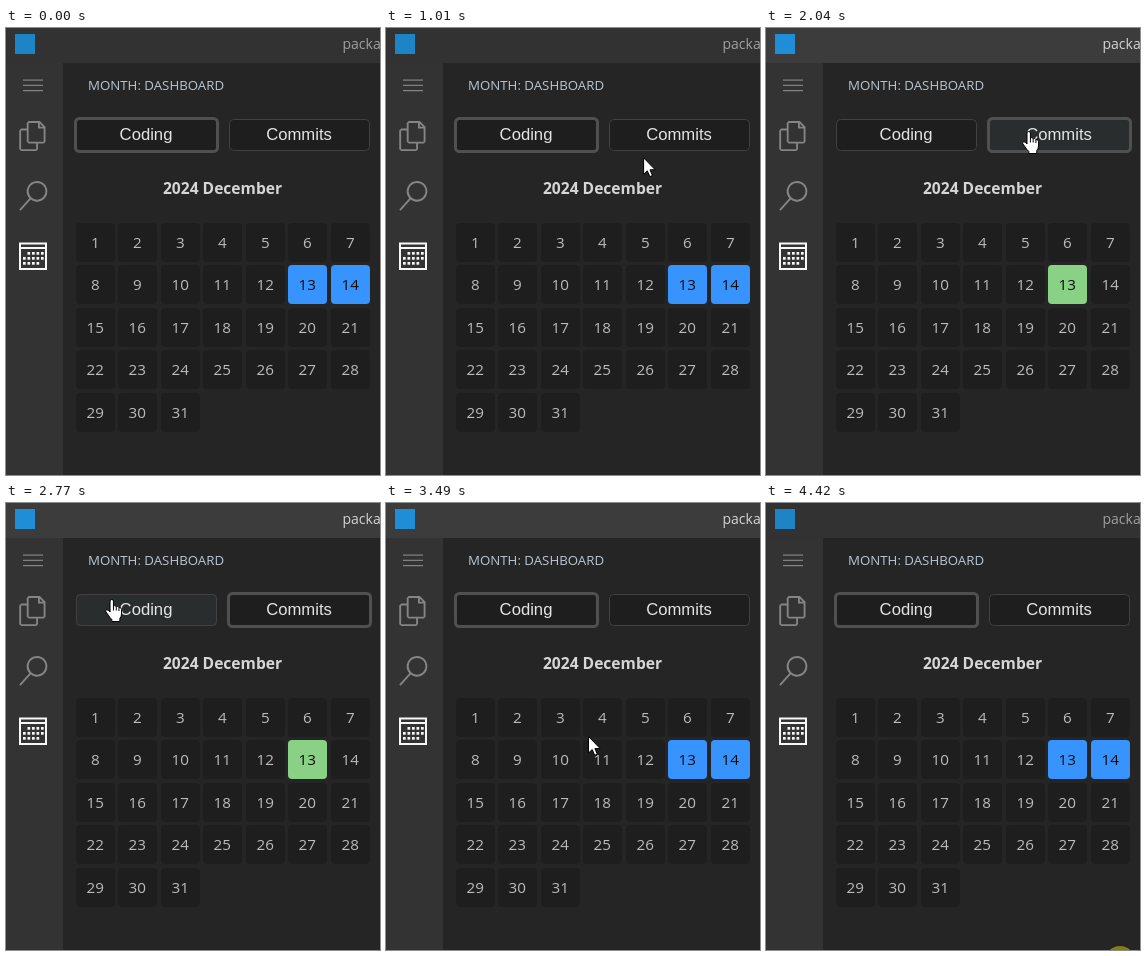
Animation, 374 px wide and 447 px high, one loop 4.48 s. Source, as an HTML page with a canvas:

```html
<!DOCTYPE html>
<html lang="en">
<head>
<meta charset="utf-8">
<title>Month dashboard</title>
<style>
  html, body { margin: 0; width: 100%; height: 100%; overflow: hidden; background: #252526; }
  canvas { display: block; width: 374px; height: 447px; }
</style>
</head>
<body>
<canvas id="stage"></canvas>
<script>
const W = 374, H = 447, LOOP = 4480, FRAME = 65;
const UI = '"Open Sans", "Noto Sans", sans-serif';
const ARIAL = '"Liberation Sans", Arial, sans-serif';
const GREY = '#858585', LIGHT = '#f8f8f8';

// Pointer rests below the stage, then makes these moves: [start, end, x, y]
const HOME = [354, 458];
const MOVES = [
  [340, 800, 257, 169],
  [870, 1140, 258, 106],
  [1280, 1280, 262, 103],
  [2310, 2770, 105, 96],
  [3295, 3750, 300, 371],
  [3820, 4040, ...HOME]
];
const PRESSES = [[1710, 1860], [3070, 3230], [4420, LOOP]];
const [TO_COMMITS, TO_CODING, BLUR] = [1860, 3230, 4420];

const BUTTON = { w: 141, y: 91, h: 32 };
const buttonX = i => 70 + 153 * i;

const canvas = document.getElementById('stage');
const ctx = canvas.getContext('2d');
const dpr = window.devicePixelRatio || 1;
canvas.width = Math.round(W * dpr);
canvas.height = Math.round(H * dpr);

function progress(t, start, length) {
  if (t < start) return 0;
  const steps = Math.floor((t - start) / FRAME) + 1;
  return Math.min(1, steps * FRAME / (length + FRAME));
}

function pointerAt(t) {
  let [x, y] = HOME;
  for (const [start, end, toX, toY] of MOVES) {
    const p = progress(t, start, end - start);
    const k = p * p * (3 - 2 * p);
    x += (toX - x) * k;
    y += (toY - y) * k;
  }
  return [x, y];
}

function isOver(i, [x, y]) {
  const left = buttonX(i);
  return x >= left && x <= left + BUTTON.w && y >= BUTTON.y && y <= BUTTON.y + BUTTON.h;
}

function rect(x, y, w, h, color) {
  ctx.fillStyle = color;
  ctx.fillRect(x, y, w, h);
}

function rounded(x, y, w, h, r) {
  ctx.beginPath();
  ctx.roundRect(x, y, w, h, r);
}

function text(str, x, y, font, color, align = 'left') {
  ctx.font = font;
  ctx.fillStyle = color;
  ctx.textAlign = align;
  ctx.fillText(str, x, y);
}

function icon(path, x, y) {
  ctx.save();
  ctx.translate(x, y);
  ctx.scale(1.25, 1.25);
  ctx.fillStyle = GREY;
  ctx.fill(path);
  ctx.restore();
}

function drawWindow(active) {
  rect(0, 0, W, H, '#252526');
  rect(0, 35, 57, H - 35, '#333333');
  rect(0, 0, W, 35, active ? '#3c3c3c' : '#323233');
  rect(9, 6, 20, 20, active ? '#1f8ed6' : '#1d84c6');
  text('package.json', 336.5, 21, '14px ' + UI, active ? '#d4d4d4' : '#a0a0a0');
  text('MONTH: DASHBOARD', 82, 62, '13.25px ' + UI, '#b9c5d0');
  text('2024 December', 216.5, 166, 'bold 15.6px ' + UI, '#d6d6d6', 'center');
}

const FILES = new Path2D('M17.5 0h-9L7 1.5V6H2.5L1 7.5v15.07L2.5 24h12.07L16 22.57V18h4.7l1.3-1.43V4.5L17.5 0zm0 2.12l2.38 2.38H17.5V2.12zm-3 20.38h-12v-15H7v9.07L8.5 18h6v4.5zm6-6h-12v-15H16V6h4.5v10.5z');
const SEARCH = new Path2D('M15.25 0a8.25 8.25 0 0 0-6.18 13.72L1 22.88l1.12 1 8.05-9.12A8.25 8.25 0 1 0 15.25 0zm0 15a6.75 6.75 0 1 1 0-13.5 6.75 6.75 0 0 1 0 13.5z');

function drawIcons() {
  for (let i = 0; i < 3; i++) rect(17, 51.5 + 5.25 * i, 20, 1.2, GREY);
  icon(FILES, 12, 93);
  icon(SEARCH, 12, 153);

  // calendar
  ctx.strokeStyle = LIGHT;
  ctx.lineWidth = 2;
  ctx.strokeRect(14, 215.5, 26, 25.5);
  rect(14, 219, 26, 2, LIGHT);
  for (let row = 0; row < 3; row++)
    for (let col = 0; col < 5; col++)
      if (row + col > 0 && row + col < 6) rect(17 + col * 4.5, 224 + row * 5, 2.7, 2.7, LIGHT);
}

function drawButton(label, x, focus, hover) {
  const { w, y, h } = BUTTON;
  rounded(x, y, w, h, 4);
  ctx.fillStyle = hover ? '#2a2d2e' : '#1e1e1e';
  ctx.fill();
  // the border grows outwards when focused
  const line = 1 + 2 * focus, inset = 1 - line / 2, grey = 65 + 15 * focus;
  rounded(x + inset, y + inset, w - 2 * inset, h - 2 * inset, 4);
  ctx.strokeStyle = `rgb(${grey}, ${grey}, ${grey})`;
  ctx.lineWidth = line;
  ctx.stroke();
  text(label, x + w / 2 - 0.5, 112, '16.67px ' + ARIAL, '#e4e4e4', 'center');
}

function drawDays(commits) {
  for (let day = 1; day <= 31; day++) {
    const x = Math.floor(70 + 42.5 * ((day - 1) % 7));
    const y = Math.floor(195 + 42.5 * Math.floor((day - 1) / 7));
    const lit = day === 13 || (day === 14 && !commits);
    rounded(x, y, 39, 39, 4);
    ctx.fillStyle = lit ? (commits ? '#89d185' : '#3794ff') : '#1e1e1e';
    ctx.fill();
    text(day, x + 19.3, y + 25, '15.2px ' + UI, lit ? '#0c0c0c' : '#bcbcbc', 'center');
  }
}

const ARROW = new Path2D('M0 0V16.5L3.7 13L6.2 18.8L8.8 17.7L6.4 12H11.6Z');
const HAND = new Path2D('M5 13V2Q5 .5 6.7 .5Q8.4 .5 8.4 2V7Q9.8 6 11.2 7.6Q12.8 6.8 13.9 8.5Q16.5 8 16.5 10.6V15Q16.5 17.5 14.8 19.5V22.5H6.8V20.5Q4.5 18.5 3.2 16L.8 12.8Q.2 11 1.8 10.7Q3.2 10.7 5 13Z');
const KNUCKLES = new Path2D('M8.4 7V11.5M11.2 8V11.5M13.9 9V12');

function drawPointer([x, y], hand, pressed) {
  ctx.save();
  ctx.translate(x, y);
  if (pressed) {
    ctx.beginPath();
    ctx.arc(0, 0, 15, 0, Math.PI * 2);
    ctx.fillStyle = 'rgba(255, 230, 0, 0.45)';
    ctx.fill();
  }
  if (hand) ctx.translate(-6, 0);
  const shape = hand ? HAND : ARROW;
  ctx.fillStyle = '#ffffff';
  ctx.strokeStyle = '#000000';
  ctx.lineWidth = 1;
  ctx.fill(shape);
  ctx.stroke(shape);
  if (hand) ctx.stroke(KNUCKLES);
  ctx.restore();
}

function draw(t) {
  ctx.setTransform(dpr, 0, 0, dpr, 0, 0);
  const pointer = pointerAt(t);
  const hover = [isOver(0, pointer), isOver(1, pointer)];
  const shift = progress(t, TO_COMMITS, 130) - progress(t, TO_CODING, 130);

  drawWindow(t >= TO_COMMITS && t < BLUR);
  drawIcons();
  drawButton('Coding', buttonX(0), 1 - shift, hover[0]);
  drawButton('Commits', buttonX(1), shift, hover[1]);
  drawDays(t >= TO_COMMITS && t < TO_CODING);
  drawPointer(pointer, hover[0] || hover[1], PRESSES.some(([from, to]) => t >= from && t < to));
}

const begin = performance.now();
function tick() {
  draw((performance.now() - begin) % LOOP);
  requestAnimationFrame(tick);
}
tick();
</script>
</body>
</html>
```
